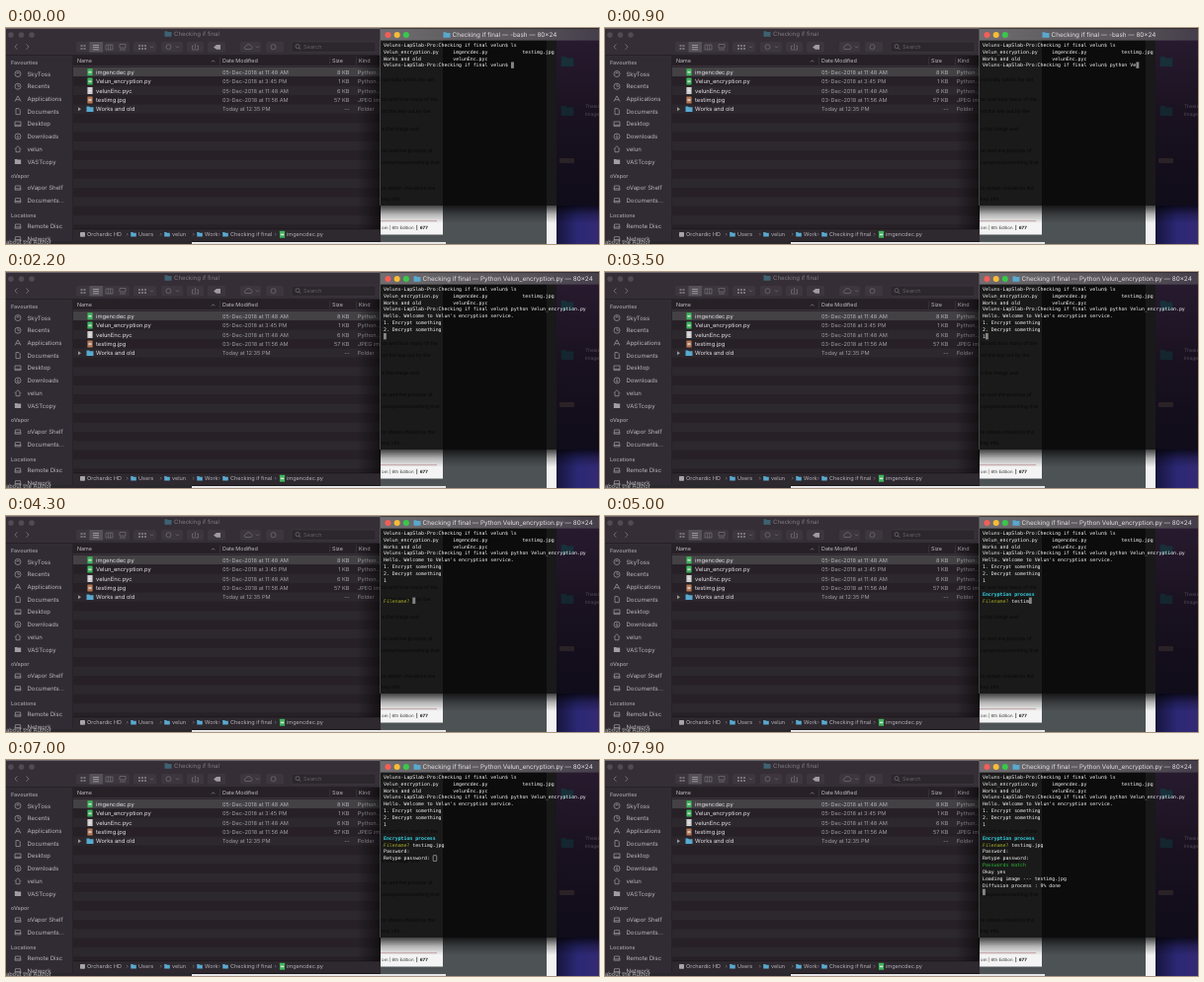
Animation, 600 px wide and 219 px high, one loop 8000 ms. Source, as an HTML page:

```html
<!DOCTYPE html>
<html lang="en">
<head>
<meta charset="utf-8">
<title>Terminal session</title>
<style>
html, body { margin: 0; width: 100%; height: 100%; overflow: hidden; background: #171419; }
svg { display: block; width: 600px; height: 219px; text-rendering: geometricPrecision; }
text { font-family: Inter, Roboto, sans-serif; white-space: pre; }
.mono text { font: 4.87px "DejaVu Sans Mono", monospace; fill: #f6f6f6; }
</style>
</head>
<body>
<svg id="stage" viewBox="0 0 600 219"></svg>
<script>
const LOOP = 8000, COL = 2.932, ROW = 6.88, LEFT = 382, TOP = 17;
const USER = 'velun', SCRIPT = 'Velun_encryption.py';
const GREEN = '#3fb45c';

const rect = (x, y, w, h, fill, more = '') =>
  `<rect x="${x}" y="${y}" width="${w}" height="${h}" fill="${fill}" ${more}/>`;
const dot = (x, y, r, fill) => `<circle cx="${x}" cy="${y}" r="${r}" fill="${fill}"/>`;
const line = (d, color, w = 0.7) =>
  `<path d="${d}" fill="none" stroke="${color}" stroke-width="${w}"/>`;
const label = (x, y, str, size, fill, more = '') =>
  `<text x="${x}" y="${y + size * 0.36}" font-size="${size}" fill="${fill}" ${more}>${str}</text>`;
const folder = (x, y, s = 1, fill = '#58a9cf') =>
  `<path transform="translate(${x} ${y}) scale(${s})" d="M-3.5 -2.8h2.6l.8 .8h3.6v4.8h-7z" fill="${fill}"/>`;
const sheet = (x, y, tint) =>
  rect(x - 2.6, y - 3.5, 5.2, 7, tint, 'rx=".5"') + rect(x - 1.6, y - 0.6, 3.2, 1.4, '#e4e4e4');
const gradient = (id, vertical, ...colors) =>
  `<linearGradient id="${id}" x2="${vertical ? 0 : 1}" y2="${vertical ? 1 : 0}">` +
  colors.map((c, i) => `<stop offset="${i / (colors.length - 1)}" stop-color="${c}"/>`).join('') +
  '</linearGradient>';

const gradients = '<defs>' +
  gradient('below', true, '#000b', '#0004', '#0000') +
  gradient('beside', false, '#0000', '#0008') +
  gradient('bar-fill', false, '#716e72', '#615e62', '#585459', '#453e4b') +
  gradient('desk', false, '#17153c', '#2b2875', '#332a72') +
  gradient('desk-dim', true, '#271a2e', '#19111f', '#100c1a') + '</defs>';

function sidebar() {
  const ink = '#b9b5bc', icon = '#a19da5';
  const groups = [
    [35, 'Favourites', 46.5, ['SkyToss', 'Recents', 'Applications', 'Documents', 'Desktop', 'Downloads', USER, 'VASTcopy']],
    [150, 'oVapor', 162, ['oVapor Shelf', 'Documents...']],
    [190, 'Locations', 201, ['Remote Disc', 'Network']]
  ];
  const glyphs = [
    'M-3 0a3 3 0 1 1 6 0a3 3 0 1 1 -6 0M-1.3 0a1.3 1.3 0 1 1 2.6 0',
    'M-3 0a3 3 0 1 1 6 0a3 3 0 1 1 -6 0M0 -2V0H1.8',
    'M-3 2.5L0 -3L3 2.5M-2 .8H2',
    'M-2 -3H1L2.3 -1.5V3H-2Z',
    'M-3 -2.3H3V2.3H-3ZM-3 1H3',
    'M-3 0a3 3 0 1 1 6 0a3 3 0 1 1 -6 0M0 -1.8V1.5M-1.2 .3L0 1.5L1.2 .3',
    'M-3 0L0 -3L3 0M-2 -.5V3H2V-.5'
  ];
  const disk = 'M-2.5 -2H2.5L3 2.2H-3ZM-3 .8H3';
  let out = rect(0, 28, 68, 188, '#312c34') + rect(67.6, 28, 0.8, 188, '#1b171c');
  let n = 0;
  for (const [y, head, first, items] of groups) {
    out += label(5, y, head, 5.4, '#99959c', 'font-weight="600"');
    items.forEach((name, i) => {
      const cy = first + i * 12.7;
      out += n === 7 ? folder(12, cy, 0.9, icon)
        : `<g transform="translate(12 ${cy})">${line(glyphs[n] || disk, icon)}</g>`;
      out += label(21.5, cy, name, 6, ink);
      n++;
    });
  }
  return out;
}

function toolbar() {
  const ink = '#77727a';
  let out = rect(0, 0, 379, 28, '#352e36') + rect(0, 0, 379, 0.7, '#7b777d') + rect(0, 27.4, 379, 0.6, '#1d191e');
  for (const x of [5, 15.5, 26]) out += dot(x, 7, 2.8, '#524b53');
  out += folder(164, 6, 1, '#3f6273') + label(170, 6, 'Checking if final', 6, '#807b82');
  out += line('M11.5 16.5l-2.6 2.6l2.6 2.6M20.5 16.5l2.6 2.6l-2.6 2.6', ink, 0.9);
  for (const [x, w] of [[71, 54], [129, 23], [157, 22], [183, 17], [204, 18], [237, 21], [263, 18]])
    out += rect(x, 14, w, 10.5, '#3d363e', 'rx="1.8"');
  out += rect(84.5, 14, 13.5, 10.5, '#565058');
  for (const x of [75.5, 78.5, 134, 137, 140])
    for (const y of [17, 20]) out += rect(x, y, 2, 2, ink);
  for (const y of [17, 19.2, 21.4]) out += rect(88, y, 6, 0.8, '#aaa5ad');
  out += line('M101 17h7v5h-7zM103.4 17v5M105.7 17v5M115 16.5h6v3.6h-6zM115 22h6M146 18.5l1.5 1.5l1.5 -1.5M253 18.5l1.5 1.5l1.5 -1.5', ink);
  out += line('M162 19.2a2.5 2.5 0 1 1 5 0a2.5 2.5 0 1 1 -5 0M172 18.5l1.5 1.5l1.5 -1.5M190 18h-1.5v4h6v-4h-1.5M191.5 21v-5M242 21.5h6a2 2 0 0 0 0 -3.5a3 3 0 0 0 -5.4 .6a1.6 1.6 0 0 0 -.6 2.9M268 19.2a2.5 2.5 0 1 1 5 0a2.5 2.5 0 1 1 -5 0', ink);
  out += `<path d="M217 17h-4l-3 2.4l3 2.4h4z" fill="#a09ba3"/>`;
  out += rect(289, 14, 85, 10.5, '#2c262d', 'rx="1.8" stroke="#453f47" stroke-width=".5"');
  return out + line('M293 18.6a2 2 0 1 1 4 0a2 2 0 1 1 -4 0M296.4 20l2 2', ink) +
    label(301, 19.2, 'Search', 5.6, '#655f67');
}

function fileList() {
  const files = [
    ['imgencdec.py', '05-Dec-2018 at 11:48 AM', '8 KB', 'Python...', GREEN],
    [SCRIPT, '05-Dec-2018 at 3:45 PM', '1 KB', 'Python...', GREEN],
    [USER + 'Enc.pyc', '05-Dec-2018 at 11:48 AM', '6 KB', 'Python...', '#cfcfcf'],
    ['testimg.jpg', '03-Dec-2018 at 11:56 AM', '57 KB', 'JPEG im...', '#b47855'],
    ['Works and old', 'Today at 12:35 PM', '--', 'Folder', '']
  ];
  let out = rect(68, 28, 311, 176, '#272127') + rect(68, 38.4, 311, 0.6, '#433d45');
  [['Name', 72], ['Date Modified', 219], ['Size', 330], ['Kind', 357]].forEach(([s, x], i) => {
    out += label(x, 33.4, s, 5.4, '#c3bfc6');
    if (i) out += rect(x - 3, 29.5, 0.5, 8, '#453f47');
  });
  out += line('M208 34.4l1.6 -1.6l1.6 1.6', '#aaa5ad', 0.6);
  for (let i = 0; i < 18; i++)
    out += rect(68, 39.8 + i * 9.4, 311, 9.4, i ? (i % 2 ? '#272127' : '#2d272e') : '#434144');
  files.forEach(([name, date, size, kind, tint], i) => {
    const y = 44.7 + i * 9.4, dim = i ? '#a09ba2' : '#b5b1b7';
    out += tint ? sheet(85, y, tint) : `<path d="M73 ${y - 2}l3 2l-3 2z" fill="#999"/>` + folder(85, y);
    out += label(91, y, name, 5.8, '#e5e1e7') + label(219, y, date, 5.6, dim);
    out += label(347.5, y, size, 5.6, dim, 'text-anchor="end"') + label(356, y, kind, 5.6, dim);
  });
  return out;
}

function pathBar() {
  const steps = [[82, 'Orchardic HD'], [134, 'Users'], [168, USER], [201, 'Work'], [227, 'Checking if final'], [284, 'imgencdec.py']];
  let out = rect(68, 204, 311, 12, '#2e282f') + rect(68, 203.6, 311, 0.6, '#171218');
  steps.forEach(([x, s], i) => {
    out += i === 0 ? rect(75, 207, 5, 4.8, '#a7a5aa', 'rx=".7"')
      : i === 5 ? sheet(x - 4.5, 209.3, GREEN) : folder(x - 5, 209.3, 0.8);
    if (i) out += line(`M${x - 12} 208l1.3 1.3l-1.3 1.3`, '#8b898e', 0.6);
    out += label(x, 209.3, s, 5.5, '#b5b1b8');
  });
  return out;
}

// Desktop and document page behind the windows.
function backdrop() {
  let out = rect(379, 180, 178, 39, '#4d5254') + rect(379, 180, 63, 29.5, '#f4f4f4');
  out += rect(547, 180, 10, 39, '#f2f2f2') + rect(557, 180, 43, 39, 'url(#desk)');
  out += line('M379 195.7H436', '#a96468', 0.5) + label(380, 202, 'om | 6th Edition', 4.4, '#333') +
    label(415, 202, '|  677', 4.4, '#111', 'font-weight="700"');
  out += rect(378, 180, 222, 18, 'url(#below)');
  return out + rect(0, 216, 188, 3, '#2b282d') + rect(188, 217, 257, 2, '#e6e6e6') +
    label(0, 217, 'about the Author', 5.8, '#bbb');
}

function terminalBack() {
  let out = rect(355, 28, 24, 176, 'url(#beside)') + rect(378.4, 1, 0.6, 179, '#6a676b');
  out += rect(379, 12, 63, 168, '#1a1a1a') + rect(442, 12, 105, 168, '#0c0c0d') +
    rect(547, 12, 10, 168, '#191919') + rect(557, 12, 43, 168, 'url(#desk-dim)');
  const prose = [[52, 'normally within the set'], [72, 'on and how many of the'], [84, 'od the key out by the'], [102, 'e the image and'],
    [124, 'on and the process of'], [136, 'compresssomething that'], [162, 'to obtain should be the'], [173, 'key info.']];
  for (const [y, s] of prose) out += label(380, y, s, 5, '#090909');
  out += folder(568, 34, 1.8, '#17303a') + folder(568, 84, 1.8, '#14262f') + rect(560, 132, 15, 5, '#2b2227', 'rx="1"');
  return out + label(586, 79, 'Thesis', 4.8, '#554c59') + label(586, 87, 'Images', 4.8, '#554c59');
}

function terminalBar(running) {
  const x = running ? 421.5 : 451.5;
  const title = `Checking if final — ${running ? 'Python ' + SCRIPT : '-bash'} — 80×24`;
  return rect(379, 0.5, 221, 12.1, 'url(#bar-fill)') +
    dot(386.5, 7, 3, '#f55e56') + dot(395.7, 7, 3, '#f6bd35') + dot(404.9, 7, 3, '#38c84c') +
    folder(x - 5.5, 7) + label(x, 7, title, 6.35, '#e2e0e3');
}

const tint = (s, fill, more = '') => `<tspan fill="${fill}" ${more}>${s}</tspan>`;
const typed = (s, t, start, step) => s.slice(0, Math.max(0, Math.floor((t - start) / step)));

// Returns the screen rows, the cursor cell and whether input is hidden.
function session(t) {
  const prompt = `Veluns-LapSlab-Pro:Checking if final ${USER}$ `;
  const command = t < 1200 ? typed('python Ve', t, 0, 100) : 'python ' + SCRIPT;
  const rows = [prompt + 'ls',
    SCRIPT.padEnd(24) + 'imgencdec.py'.padEnd(24) + 'testimg.jpg',
    'Works and old'.padEnd(24) + USER + 'Enc.pyc', prompt + command];
  let at = rows[3].length, secret = false;
  const blinkOn = (t + 400) % 1000 < 500;
  if (t >= 1700) { rows.push(''); at = 0; }
  if (t >= 2000) {
    rows.splice(4, 1, "Hello. Welcome to Velun's encryption service.", '1. Encrypt something', '2. Decrypt something', t < 3100 ? '' : '1');
    at = rows[7].length;
  }
  if (t >= 3800) {
    const name = typed('testimg.jpg', t, 4270, 120);
    rows.push('', blinkOn ? tint('Encryption process', '#35d7e8', 'font-weight="700"') : '',
      tint('Filename?', '#a7ae24') + ' ' + name);
    at = 10 + name.length;
  }
  if (t >= 5800) { rows.push('Password: '); at = 10; secret = true; }
  if (t >= 6700) { rows.push('Retype password: '); at = 17; }
  if (t >= 7300) {
    secret = false;
    rows[12] = 'Retype password:';
    rows.push(blinkOn ? tint('Passwords match', '#27b832') : '', 'Okay yes', 'Loading image --- testimg.jpg');
    if (t >= 7500) rows.push(`Diffusion process : ${Math.min(9, 1 + Math.floor((t - 7500) / 50))}% done`);
    rows.push('');
    at = 0;
  }
  return { rows, at, secret };
}

function terminalText(t) {
  const { rows, at, secret } = session(t);
  const x = LEFT + at * COL, y = TOP + (rows.length - 1) * ROW - 3.2;
  const cursor = secret
    ? rect(x + 0.3, y + 0.3, 3.6, 5.9, 'none', 'stroke="#ccc" stroke-width=".6" rx=".7"')
    : rect(x, y, 2.9, 6.4, '#858585');
  return cursor + rows.map((s, i) => `<text x="${LEFT}" y="${TOP + i * ROW + 1.75}">${s}</text>`).join('');
}

const stage = document.getElementById('stage');
stage.innerHTML = gradients + toolbar() + sidebar() + fileList() + pathBar() + backdrop() +
  terminalBack() + '<g id="bar"></g><g id="screen" class="mono"></g>';
const bar = document.getElementById('bar'), screenText = document.getElementById('screen');
const begin = performance.now();

function draw() {
  const t = (performance.now() - begin) % LOOP;
  bar.innerHTML = terminalBar(t >= 1800);
  screenText.innerHTML = terminalText(t);
  requestAnimationFrame(draw);
}
draw();
</script>
</body>
</html>
```
